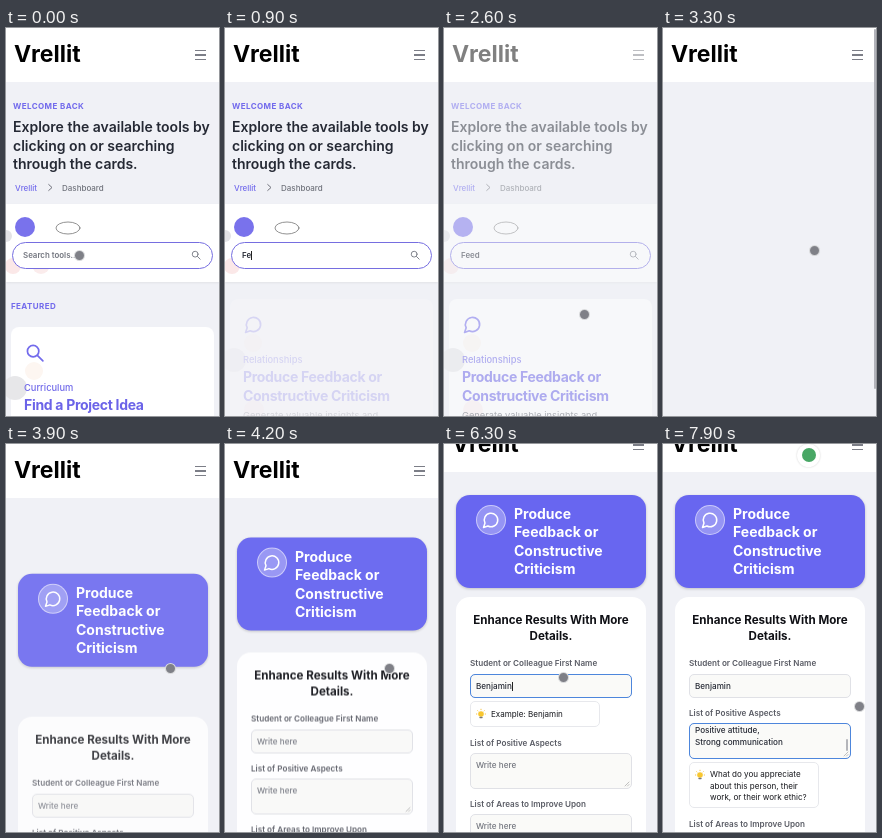
An HTML page for the animation above (8 s loop, 213x388 px).

```html
<!DOCTYPE html>
<html lang="en">
<head>
<meta charset="utf-8">
<title>Tool search and form</title>
<style>
  html, body { margin: 0; width: 100%; height: 100%; overflow: hidden; background: #f0f1f6; }
  #stage { position: relative; width: 213px; height: 388px; overflow: hidden; background: #f0f1f6;
    font-family: Inter, Roboto, sans-serif; color: #252934; }
  #stage * { box-sizing: border-box; }
  #stage div, #stage svg { position: absolute; }
  .t { white-space: pre; line-height: 12px; }
  svg { fill: none; stroke-linecap: round; stroke-linejoin: round; overflow: visible; }

  /* every animation shares the same 8 s clock */
  .a { animation: 8s linear infinite both; }
  .step { animation-timing-function: step-end; }

  .page { inset: 0; animation-name: scroll; }
  .head { left: 0; top: 0; width: 213px; height: 54px; background: #fff; }
  .brand { inset: 0; animation-name: brand; }
  .name { left: 8px; top: 12px; font-size: 23px; font-weight: 700; line-height: 28px; color: #000; }
  .menu { left: 189px; top: 22px; width: 11px; height: 10px; border: solid #7c7e87; border-width: 1.5px 0; }
  .menu::after { content: ""; position: absolute; top: 3px; width: 11px; height: 1.5px; background: #7c7e87; }

  .home { left: 0; top: 54px; width: 213px; height: 334px; background: #f0f1f6; overflow: hidden; animation-name: home; }
  .eyebrow { font-size: 8px; font-weight: 700; letter-spacing: .4px; color: #726aec; }
  .lead { left: 7px; top: 36.2px; font-size: 14px; font-weight: 600; line-height: 18.5px; }
  .crumb { top: 99.5px; font-size: 8px; font-weight: 500; color: #70737c; }
  .band { left: 0; top: 122px; width: 213px; height: 78px; background: #fff; box-shadow: 0 1px 2px #0001; }
  .dot { left: 8.5px; top: 134.5px; width: 20px; height: 20px; border-radius: 50%; background: #7972ec; }
  .pill { left: 6px; top: 160px; width: 201px; height: 27px; border: 1.5px solid #766ee0; border-radius: 14px; background: #fff; }
  .query { left: 17px; top: 167px; font-size: 7.9px; font-weight: 600; }
  .result { left: 5px; top: 245px; width: 203px; height: 140px; border-radius: 8px; background: #fffffff0; }
  .result.one { animation-name: early; }
  .result.two { top: 217px; height: 170px; animation-name: late; }
  .kind { left: 13px; top: 55.3px; font-size: 9.3px; font-weight: 450; color: #716aea; }
  .title { left: 13px; top: 67.7px; font-size: 14px; font-weight: 700; line-height: 19px; letter-spacing: -.022em; color: #6b63e8; }
  .blurb { left: 13px; top: 111px; font-size: 9.3px; color: #6b6e77; }
  .early { animation-name: early; }
  .late { animation-name: late; }

  .banner { left: 12px; top: 77px; width: 190px; height: 93px; border-radius: 14px; background: #6866f0;
    box-shadow: 0 1px 3px #0003; animation-name: banner; }
  .badge { left: 20px; top: 10px; width: 30px; height: 30px; border-radius: 50%; background: #ffffff4d; border: 1px solid #ffffff80; }
  .banner .t { left: 58px; top: 9.5px; font-size: 14px; font-weight: 700; line-height: 18.5px; color: #fff; }
  .panel { left: 12px; top: 179px; width: 190px; height: 360px; border-radius: 14px; background: #fff; animation-name: panel; }
  .panel h2 { position: absolute; left: 0; top: 14.5px; width: 190px; margin: 0; text-align: center;
    font-size: 11.6px; font-weight: 700; line-height: 16px; color: #101116; }
  .group { left: 14px; width: 162px; height: 60px; }
  .label { left: 0; top: 0; font-size: 8.15px; font-weight: 600; color: #5a5c65; }
  .box { left: 0; top: 17px; width: 162px; height: 24px; border: 1px solid #e0e1e6; border-radius: 5px; background: #fafaf8; overflow: hidden; }
  .area { top: 16px; height: 36px; }
  .box .t { left: 5px; top: 5px; font-size: 8.15px; font-weight: 500; }
  .grip { right: 1px; bottom: 1px; }
  .ring { border: 1.5px solid #4d86dc; border-radius: 5px; left: 0; width: 162px; }
  .tip { left: 0; width: 130px; border: 1px solid #e7e8ec; border-radius: 5px; background: #fff; }
  .tip .t { left: 20px; top: 6px; font-size: 8.05px; color: #17181d; }
  .first { animation-name: first; }
  .second { animation-name: second; }
  .positive { top: 110px; animation-name: positive; }
  .areas { top: 171px; animation-name: areas; }
  .helper { left: 134px; top: 0; width: 23px; height: 23px; border-radius: 50%; background: #fff; box-shadow: 0 0 2px #0003; animation-name: helper; }
  .helper div { left: 4.5px; top: 4px; width: 14px; height: 14px; border-radius: 50%; background: #48a765; }

  .bar { right: 0; top: 1px; width: 1.7px; border-radius: 1px; background: #b2b3ba; animation-name: bar; }
  .cursor { left: -5.5px; top: -5.5px; width: 11px; height: 11px; border-radius: 50%; background: #7f8087;
    border: .6px solid #ffffffb0; animation-name: cursor; }
  .caret { display: inline-block; width: 1px; height: 9px; margin-right: -1px; vertical-align: -1.5px; background: #222; }
  .empty { color: #73767f; }

  @keyframes scroll { 0%, 58.75% { transform: none; animation-timing-function: ease-out; }
    63.75% { transform: translateY(-22px); } 66.25%, 100% { transform: translateY(-26px); } }
  @keyframes brand { 0%, 31.25% { opacity: 1; } 33.75%, 36.25% { opacity: 0; } 38.75%, 100% { opacity: 1; } }
  @keyframes home { 0%, 31.25% { opacity: 1; } 33.75%, 100% { opacity: 0; } }
  @keyframes early { 0%, 8.75% { opacity: 1; } 11.25%, 100% { opacity: 0; } }
  @keyframes late { 0%, 10% { opacity: 0; } 16.25%, 100% { opacity: 1; } }
  @keyframes banner { 0%, 42.5% { opacity: 0; transform: translateY(90px); }
    48.75% { opacity: .88; transform: translateY(53px); animation-timing-function: ease-out; }
    56.25%, 100% { opacity: 1; transform: none; } }
  @keyframes panel { 0%, 43.75% { opacity: 0; transform: translateY(130px); }
    48.75% { opacity: .78; transform: translateY(94px); animation-timing-function: ease-out; }
    56.25%, 100% { opacity: 1; transform: none; } }
  @keyframes first { 0% { opacity: 0; } 73.75% { opacity: 1; } 90%, 100% { opacity: 0; } }
  @keyframes second { 0% { opacity: 0; } 90%, 100% { opacity: 1; } }
  @keyframes positive { 0% { transform: none; } 73.75% { transform: translateY(30px); } 90%, 100% { transform: none; } }
  @keyframes areas { 0% { transform: none; } 73.75% { transform: translateY(30px); } 90%, 100% { transform: translateY(50px); } }
  @keyframes helper { 0%, 92.5% { opacity: 0; } 95%, 100% { opacity: 1; } }
  @keyframes bar { 0%, 35% { opacity: 0; height: 360px; } 36.25%, 46.25% { opacity: 1; height: 360px; }
    48.5% { opacity: 0; height: 231px; } 58% { opacity: 0; height: 231px; }
    58.75%, 67.5% { opacity: 1; height: 231px; } 71.25%, 100% { opacity: 0; height: 231px; } }
  @keyframes cursor {
    0%, 5% { opacity: 1; transform: translate(73px, 227px); }
    7.5% { opacity: 0; transform: translate(73px, 227px); }
    25% { opacity: 0; transform: translate(128px, 270px); }
    26.25% { opacity: 1; transform: translate(130px, 274px); }
    28.75%, 33.75% { opacity: 1; transform: translate(140px, 286px); }
    41.25% { transform: translate(151px, 222px); }
    48.75%, 58.75% { transform: translate(164px, 224px); }
    63.75%, 67.5% { transform: translate(131px, 213px); }
    71.25%, 73.75% { transform: translate(125px, 235px); }
    78.75%, 80% { transform: translate(119px, 233px); }
    83.75% { transform: translate(123px, 262px); }
    87.5%, 90% { transform: translate(132px, 323px); }
    98.75%, 100% { opacity: 1; transform: translate(196px, 262px); }
  }
</style>
</head>
<body>
<div id="stage">
  <svg width="0" height="0">
    <defs>
      <path id="chat" d="M7.9 20A9 9 0 1 0 4 16.1L2 22Z"/>
      <g id="lens"><circle cx="10" cy="10" r="7"/><path d="M15.5 15.5 22 22"/></g>
      <g id="bulb"><circle cx="5" cy="5" r="2.8" fill="#f8c62f"/><path d="M4 8.5h2" stroke="#777" stroke-width="1.4"/><path d="M5 .2v.5M.4 5h.4M9.2 5h.4M1.7 1.7l.3.3M8.3 1.7 8 2" stroke="#f3b51d" stroke-width=".8"/></g>
      <path id="corner" d="M1 5 5 1M3.5 5 5 3.5" stroke="#999" stroke-width=".6"/>
      <g id="bubbles"><circle cx="4" cy="61" r="12" fill="#e7e7e9"/><circle cx="23" cy="44" r="9" fill="#fdf6f1"/></g>
    </defs>
  </svg>

  <div class="page a">
    <div class="head">
      <div class="brand a">
        <div class="t name">Vrellit</div>
        <div class="menu"></div>
      </div>
    </div>

    <div class="banner a">
      <div class="badge"></div>
      <svg style="left:26px;top:16px" width="18" height="18" viewBox="0 0 24 24" stroke="#fff" stroke-width="2"><use href="#chat"/></svg>
      <div class="t">Produce
Feedback or
Constructive
Criticism</div>
    </div>

    <div class="panel a">
      <h2>Enhance Results With More<br>Details.</h2>
      <div class="group" style="top:60px">
        <div class="t label">Student or Colleague First Name</div>
        <div class="box"><div class="t" id="who"></div></div>
        <div class="ring first a step" style="top:17px;height:24px"></div>
        <div class="tip first a step" style="top:44px;height:26px">
          <svg style="left:5px;top:7px" width="10" height="10"><use href="#bulb"/></svg>
          <div class="t">Example: Benjamin</div>
        </div>
      </div>
      <div class="group positive a step">
        <div class="t label">List of Positive Aspects</div>
        <div class="box area">
          <div class="t" id="praise"></div>
          <svg class="grip" width="6" height="6"><use href="#corner"/></svg>
        </div>
        <div class="ring second a step" style="top:16px;height:36px"></div>
        <div id="thumb" style="left:157px;top:32px;width:2px;height:12px;border-radius:1px;background:#b4b5ba"></div>
        <div class="tip second a step" style="top:55px;height:46px">
          <svg style="left:5px;top:7px" width="10" height="10"><use href="#bulb"/></svg>
          <div class="t" style="line-height:11.5px">What do you appreciate
about this person, their
work, or their work ethic?</div>
        </div>
      </div>
      <div class="group areas a step">
        <div class="t label">List of Areas to Improve Upon</div>
        <div class="box area">
          <div class="t empty">Write here</div>
          <svg class="grip" width="6" height="6"><use href="#corner"/></svg>
        </div>
      </div>
    </div>

    <div class="home a">
      <div class="t eyebrow" style="left:7px;top:17.5px">WELCOME BACK</div>
      <div class="t lead">Explore the available tools by
clicking on or searching
through the cards.</div>
      <div class="t crumb" style="left:9px;color:#726aec">Vrellit</div>
      <svg style="left:42px;top:102px" width="5" height="7" stroke="#70727c"><path d="M.7.5 4 3.5.7 6.5"/></svg>
      <div class="t crumb" style="left:56px">Dashboard</div>

      <div class="band"></div>
      <svg width="213" height="334">
        <circle cy="154" r="6" fill="#e3e3e6"/><circle cx="7" cy="184" r="8" fill="#fbe8e8"/>
        <circle class="early a" cx="35" cy="183" r="9" fill="#fbecec"/>
      </svg>
      <div class="dot"></div>
      <svg style="left:0;top:0" width="90" height="160"><ellipse cx="62" cy="146" rx="12" ry="6" fill="#fff" stroke="#777" stroke-width=".8"/></svg>
      <div class="pill"></div>
      <div class="t query" id="query"></div>
      <svg style="left:185px;top:168px" width="10" height="10" viewBox="0 0 24 24" stroke="#777a83" stroke-width="2.2"><use href="#lens"/></svg>

      <div class="t eyebrow early a" style="left:5px;top:218px">FEATURED</div>
      <div class="result one a">
        <svg width="203" height="90"><use href="#bubbles"/></svg>
        <svg style="left:14px;top:16px" width="19.5" height="19.5" viewBox="0 0 24 24" stroke="#736bec" stroke-width="2.1"><use href="#lens"/></svg>
        <div class="t kind">Curriculum</div>
        <div class="t title">Find a Project Idea</div>
      </div>
      <div class="result two a">
        <svg width="203" height="120"><use href="#bubbles"/><circle cx="24" cy="111" r="10" fill="#fdf1f1"/></svg>
        <svg style="left:14px;top:16px" width="19" height="19" viewBox="0 0 24 24" stroke="#736bec" stroke-width="2.1"><use href="#chat"/></svg>
        <div class="t kind">Relationships</div>
        <div class="t title">Produce Feedback or
Constructive Criticism</div>
        <div class="t blurb">Generate valuable insights and</div>
      </div>
    </div>
  </div>

  <div class="helper a"><div></div></div>
  <div class="bar a"></div>
  <div class="cursor a"></div>
</div>

<script>
  const LOOP = 8000;
  const $ = id => document.getElementById(id);
  const fields = [
    { el: $('query'), hint: 'Search tools...', text: 'Feed', from: 600, step: 160, focus: 200, blur: 2700 },
    { el: $('who'), hint: 'Write here', text: 'Benjamin', from: 5950, step: 40, focus: 5900, blur: 7200 },
    { el: $('praise'), hint: 'Write here', text: 'Positive attitude,\nStrong communication', from: 7250, step: 13, focus: LOOP, blur: LOOP }
  ];

  function draw(f, t) {
    const count = Math.max(0, Math.min(f.text.length, Math.floor((t - f.from) / f.step) + 1));
    const idle = t - (f.from + f.step * (f.text.length - 1));
    const caret = t >= f.focus && t < f.blur && (idle < 0 || Math.floor(idle / 500) % 2 === 0);
    const key = count + '/' + caret;
    if (key === f.key) return;
    f.key = key;
    f.el.textContent = count ? f.text.slice(0, count) : f.hint;
    f.el.classList.toggle('empty', !count);
    if (caret) {
      const bar = document.createElement('span');
      bar.className = 'caret';
      count ? f.el.append(bar) : f.el.prepend(bar);
    }
  }

  let start;
  function tick(now) {
    start ??= now;
    const t = (now - start) % LOOP;
    fields.forEach(f => draw(f, t));
    const scrolled = t >= 7500;
    $('praise').style.top = scrolled ? '0' : '5px';
    $('thumb').style.opacity = scrolled ? 1 : 0;
    requestAnimationFrame(tick);
  }
  requestAnimationFrame(tick);
</script>
</body>
</html>
```
